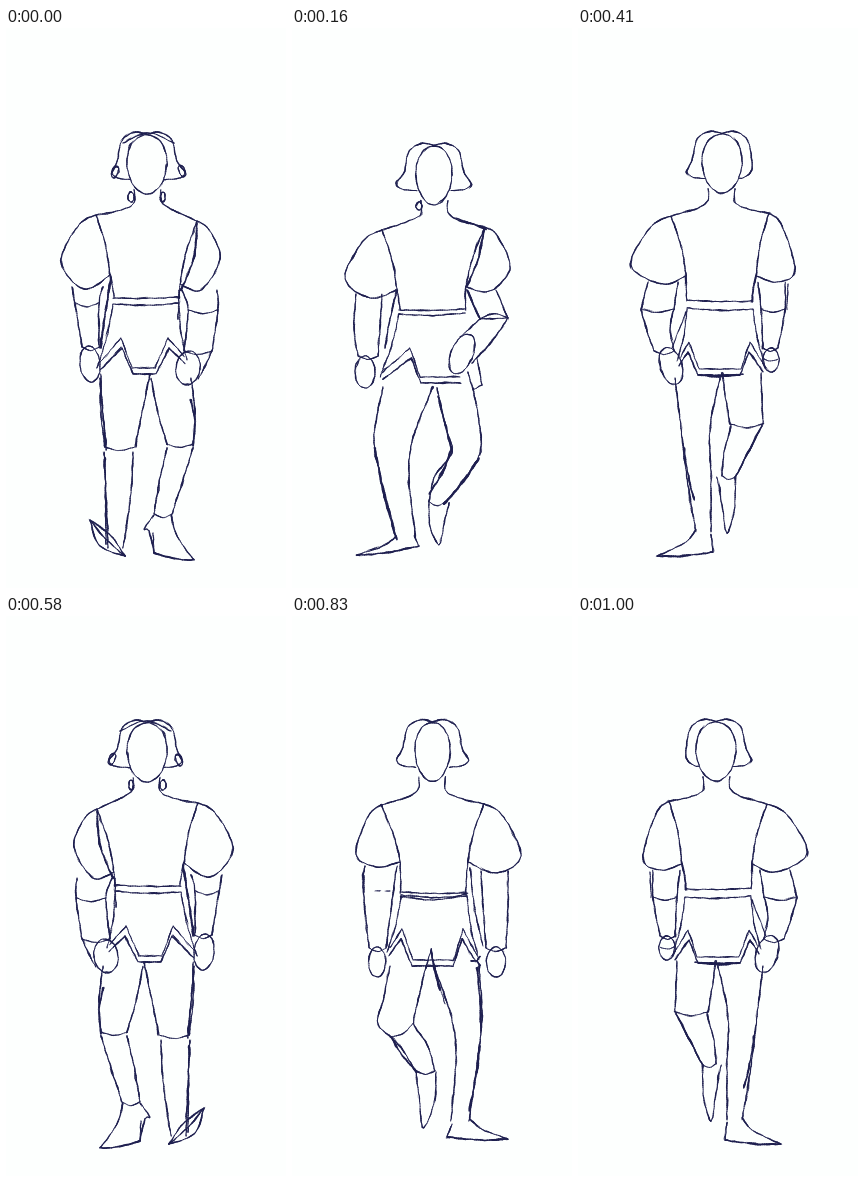
An HTML page with a canvas for the animation above (1.08 s loop, 280 by 560 pixels).

```html
<!DOCTYPE html>
<html lang="en">
<head>
<meta charset="utf-8">
<title>Walk cycle</title>
<style>
html, body { margin: 0; width: 100%; height: 100%; overflow: hidden; background: #fdfffe; }
canvas { display: block; }
</style>
</head>
<body>
<canvas id="stage" width="280" height="560"></canvas>
<script>
const ctx = document.getElementById('stage').getContext('2d');
const PAPER = '#fdfffe', INK = '#1f2050';
const AXIS = 141, LOOP = 1080;

const mix = (a, b, t) => a + (b - a) * t;
const between = (a, b, tx, ty = tx) => [mix(a[0], b[0], tx), mix(a[1], b[1], ty)];
const wave = (d, seed) => (Math.sin(d * 0.13 + seed) + Math.sin(d * 0.37 + seed * 2.3)) / 2;

// Catmull-Rom position on one axis
function spline(a, b, c, d, t) {
  return b + t * ((c - a) + t * ((2 * a - 5 * b + 4 * c - d) + t * (3 * b - a - 3 * c + d))) / 2;
}

// Trace the points about every 2 px
function trace(points, smooth) {
  const at = i => points[Math.max(0, Math.min(points.length - 1, i))];
  const out = [points[0]];
  for (let i = 0; i < points.length - 1; i++) {
    const a = at(i - 1), b = at(i), c = at(i + 1), d = at(i + 2);
    const steps = Math.max(2, Math.ceil(Math.hypot(c[0] - b[0], c[1] - b[1]) / 2));
    for (let s = 1; s <= steps; s++) {
      const t = s / steps;
      out.push(smooth ? [0, 1].map(k => spline(a[k], b[k], c[k], d[k], t)) : between(b, c, t));
    }
  }
  return out;
}

// A main pencil line, then a loose second one that comes and goes
function sketch(weight, points, smooth) {
  const path = trace(points, smooth);
  const seed = points[0][0] * 1.7 + points[0][1];
  for (let pass = 0; pass < 2; pass++) {
    const drift = d => pass * 0.9 * wave(d / 3, seed + 4) + 0.35 * wave(d * 2, seed + pass);
    for (let i = 1; i < path.length; i++) {
      const d = i * 2, press = wave(d, seed + pass * 5);
      const width = weight * (pass ? 0.2 + 1.1 * press : 1.1 + 0.35 * press);
      if (width < 0.2) continue;
      ctx.lineWidth = width;
      ctx.beginPath();
      ctx.moveTo(path[i - 1][0] + drift(d - 2), path[i - 1][1] + drift(d + 5));
      ctx.lineTo(path[i][0] + drift(d), path[i][1] + drift(d + 7));
      ctx.stroke();
    }
  }
}

const pen = (weight, ...points) => sketch(weight, points, true);
const edge = (weight, ...points) => sketch(weight, points, false);

// Arc from a to b; a positive bend bulges left of a downward stroke
function bow(weight, a, b, bend) {
  const dx = b[0] - a[0], dy = b[1] - a[1], len = Math.hypot(dx, dy), m = between(a, b, 0.5);
  pen(weight, a, [m[0] - dy / len * bend, m[1] + dx / len * bend], b);
}

// Ellipse; a positive taper narrows the bottom
function oval([x, y], rx, ry, tilt = 0, taper = 0) {
  const points = [];
  for (let i = 0; i <= 16; i++) {
    const a = i * Math.PI / 8;
    const u = rx * Math.cos(a) * (1 - taper * Math.sin(a)), v = ry * Math.sin(a);
    points.push([x + u * Math.cos(tilt) - v * Math.sin(tilt), y + u * Math.sin(tilt) + v * Math.cos(tilt)]);
  }
  pen(1, ...points);
}

// Rows are [y, left, right]; the last few get a seam across
function limb(seams, ...rows) {
  pen(1.15, ...rows.map(([y, l]) => [l, y]));
  pen(1.15, ...rows.map(([y, , r]) => [r, y]));
  for (const [y, l, r] of rows.slice(rows.length - seams)) bow(0.9, [l, y], [r, y], 3.5);
}

function head([x, y], w, flicks) {
  oval([x, y], w, 29.5, 0, 0.08);
  flicks.forEach((flick, i) => {
    const p = (dx, dy) => [x + (i ? dx : -dx), y + dy];
    pen(1.1, p(0, -30), p(13, -32), p(25, -24), p(30, -3), p(flick, 8), p(flick - 7, 14), p(17, 15));
  });
}

// Puffed sleeve, its seam and the side of the torso
function sleeve([top, out, low, pit], waist) {
  const inward = top[0] < AXIS ? 2.5 : -2.5, m = between(top, pit, 0.5);
  pen(1.1, top, between(top, out, 0.5, 0.22), out, low, pit);
  pen(1.1, top, [m[0] + inward, m[1]], pit, [AXIS - inward * 13, waist]);
}

// Two zigzag lines: end, notch, flat, flat, notch, end
function hem(peak, base, xs) {
  const level = [0.85, 0, 1, 1, 0, 0.6];
  for (const low of [0, 1]) {
    edge(0.9 + low * 0.3, ...xs.map((x, i) => [x + low, mix(peak + low * 10, base + low * 6, level[i])]));
  }
}

function body({ face, width, flicks = [36, 36], left, right, waist, gap, notch, base, xs }) {
  const [x, y] = face;
  head(face, width, flicks);
  pen(1, [x - 13, y + 25], [x - 13, y + 38], [x - 24, y + 45], left[0]);
  pen(1.1, [x + 14, y + 25], [x + 14, y + 37], [x + 25, y + 45], right[0]);
  sleeve(left, waist);
  sleeve(right, waist);
  bow(1, [107, waist], [173, waist - 1], 1);
  bow(1, [107, waist + gap], [173, waist + gap - 1], 2);
  hem(notch, base, xs);
  bow(0.9, [107, waist + gap], [xs[0] - 2, base], -2);
  if (xs.length > 4) bow(0.9, [173, waist + gap], [xs[5] + 3, base - 8], 2);
}

// Foot hanging from the ankle line to its toe
function hanging(l, r, y, toe) {
  pen(1, [l, y], [mix(l, toe[0], 0.3) - 2, mix(y, toe[1], 0.55)], toe, [mix(r, toe[0], 0.5), mix(y, toe[1], 0.5)], [r, y]);
}

// Foot on the ground; front and back are the ankle's two sides
function standing(front, back, toe, heel) {
  const sole = between(toe, heel, 0.45);
  pen(1.1, front, between(front, toe, 0.3, 0.5), toe);
  pen(1.5, toe, [sole[0], sole[1] + 2], heel);
  bow(1, heel, back, 0);
}

function contact() {
  body({
    face: [141, 136.5], width: 20, flicks: [35, 38],
    left: [[90, 187], [55, 234], [78, 261], [104, 247]],
    right: [[191, 193], [214, 230], [195, 262], [174, 256]],
    waist: 270, gap: 6, notch: 310, base: 340, xs: [93, 115, 126, 149, 162, 178]
  });
  bow(1, [117, 115], [168, 115], -10);
  oval([109, 144], 3, 6, 0.4);
  oval([176, 143], 3, 6, -0.4);
  oval([125, 169], 3, 5);
  oval([157, 169], 2, 5);
  bow(1.6, [191, 195], [175, 262], -5);
  // arms
  limb(2, [259, 66, 97], [275, 69, 93], [319, 76, 93]);
  limb(2, [262, 176, 211], [282, 182, 212], [323, 178, 206]);
  bow(1.7, [105, 249], [94, 320], 0);
  bow(1, [173, 262], [172, 291], 0);
  oval([84, 336], 10, 18, -0.1);
  oval([182, 340], 12, 17, 0.15);
  bow(1, [206, 322], [192, 351], -1);
  // legs
  limb(1, [346, 95, 144], [385, 95, 136], [419, 99, 129]);
  limb(0, [424, 98, 127], [465, 100, 125], [520, 102, 117]);
  limb(1, [350, 145, 185], [385, 152, 189], [416, 161, 187]);
  limb(1, [420, 161, 187], [455, 153, 176], [486, 148, 166]);
  bow(1.4, [94, 350], [100, 422], 0);
  bow(1.2, [99, 430], [100, 516], 0);
  bow(1.4, [185, 372], [187, 418], -3);
  for (const bend of [11, 2, -4]) bow(1.2, [84, 492], [119, 528], bend);
  standing([165, 487], [147, 505], [188, 532], [148, 525]);
  pen(1.2, [148, 487], [138, 501], [143, 503], [148, 524]);
}

function down() {
  body({
    face: [142, 147.5], width: 18, flicks: [38, 37],
    left: [[90, 202], [53, 250], [78, 270], [105, 262]],
    right: [[193, 199], [218, 240], [198, 263], [174, 259]],
    waist: 282, gap: 4, notch: 320, base: 349, xs: [90, 118, 128, 168]
  });
  oval([127, 178], 3, 4);
  bow(1.5, [164, 190], [194, 201], 0);
  bow(1.6, [192, 201], [175, 258], -3);
  // arms
  limb(1, [266, 64, 90], [300, 62, 88], [328, 66, 86]);
  bow(1.3, [105, 262], [93, 320], 1);
  oval([73, 344], 10, 16);
  bow(1, [204, 262], [216, 290], 0);
  bow(1.6, [175, 262], [188, 291], 0);
  for (const bend of [-5, 0]) bow(1, [188, 291], [216, 290], bend);
  bow(1, [188, 291], [168, 309], 0);
  bow(1.3, [216, 290], [180, 335], -2);
  oval([170, 326], 11, 21, 0.4);
  edge(1, [176, 344], [181, 362], [190, 357], [185, 330]);
  // legs
  limb(0, [359, 91, 141], [410, 82, 121], [450, 89, 117], [512, 105, 124]);
  limb(1, [360, 145, 181], [400, 154, 188], [424, 160, 188], [448, 143, 175], [474, 137, 153]);
  bow(1.5, [83, 420], [104, 510], 2);
  bow(1.4, [146, 368], [160, 424], 0);
  bow(1.7, [160, 418], [137, 466], -3);
  bow(1.7, [187, 430], [152, 476], -2);
  standing([104, 508], [122, 508], [65, 527], [127, 518]);
  hanging(137, 157, 475, [147, 517]);
}

function pass() {
  body({
    face: [141.5, 136], width: 17.5,
    left: [[90, 188], [53, 240], [78, 257], [106, 246]],
    right: [[193, 189], [218, 238], [197, 251], [174, 246]],
    waist: 277, gap: 3, notch: 313, base: 344, xs: [97, 111, 120, 161, 172, 184]
  });
  bow(1, [107, 278], [173, 280], 5);
  // arms
  limb(1, [255, 66, 93], [290, 66, 91], [332, 68, 88]);
  limb(1, [250, 177, 209], [270, 180, 211], [332, 188, 205]);
  bow(1, [104, 252], [91, 330], -2);
  bow(1.4, [211, 259], [210, 276], 0);
  for (const x of [184, 194]) bow(0.6, [x, 275], [x + 5, 275], 0);
  oval([78, 346], 9.5, 15);
  oval([197, 346], 8.5, 15);
  // loose scribble at the corner of the tunic
  for (let i = 0; i < 6; i++) {
    const a = i * 2.1;
    bow(1, [97, 345], [97 + 6 * Math.cos(a), 345 + 5 * Math.sin(a)], 0);
  }
  bow(1.6, [143, 333], [134, 374], -1);
  bow(0.8, [143, 334], [129, 388], -1);
  bow(1, [143, 334], [148, 352], 0);
  // legs
  limb(0, [350, 95, 140], [400, 92, 123], [440, 96, 118], [505, 105, 123]);
  limb(1, [350, 148, 184], [385, 156, 191], [408, 160, 196], [428, 147, 176], [455, 139, 158]);
  bow(1.5, [97, 352], [93, 415], 1);
  bow(1.5, [94, 430], [105, 495], 1);
  bow(0.8, [160, 406], [184, 421], 4);
  bow(1.5, [182, 422], [157, 456], -2);
  standing([104, 503], [122, 508], [66, 523], [127, 521]);
  hanging(138, 158, 456, [151, 512]);
}

function rise() {
  body({
    face: [138, 135.5], width: 20, flicks: [29, 35],
    left: [[91, 185], [65, 243], [83, 254], [104, 248]],
    right: [[189, 188], [229, 237], [198, 256], [174, 248]],
    waist: 273, gap: 8, notch: 314, base: 341, xs: [96, 110, 119, 161, 171, 180]
  });
  // arms
  limb(2, [254, 75, 102], [281, 75, 99], [320, 82, 97]);
  limb(1, [254, 182, 212], [281, 186, 219]);
  limb(1, [281, 186, 219], [300, 190, 214], [323, 186, 206]);
  bow(1, [104, 249], [108, 274], -1);
  bow(0.8, [72, 256], [73, 282], 0);
  bow(0.9, [174, 284], [188, 320], 0);
  oval([89, 332], 8, 12);
  bow(0.8, [82, 331], [97, 331], 2);
  oval([189, 338], 11, 19, 0.3);
  bow(1.6, [117, 346], [162, 347], 2);
  // legs
  limb(1, [345, 99, 138], [372, 98, 134], [396, 97, 130]);
  limb(1, [398, 98, 129], [425, 112, 136], [448, 124, 138]);
  limb(0, [350, 140, 185], [400, 150, 179], [450, 149, 173], [504, 149, 164]);
  bow(1.4, [98, 397], [124, 448], 0);
  bow(1.3, [176, 420], [166, 472], -1);
  hanging(125, 143, 449, [133, 505]);
  standing([164, 502], [149, 506], [203, 528], [147, 524]);
}

// start time, pose, mirrored
const STEPS = [
  [0, contact, false], [160, down, false], [330, pass, false], [410, rise, true],
  [580, contact, true], [660, down, true], [830, pass, true], [1000, rise, false]
];

let shown = null;

function show(now) {
  const time = now % LOOP;
  const step = STEPS.filter(s => s[0] <= time).pop();
  if (step === shown) return;
  shown = step;
  const [, pose, mirrored] = step;
  ctx.setTransform(1, 0, 0, 1, 0, 0);
  ctx.fillStyle = PAPER;
  ctx.fillRect(0, 0, 280, 560);
  if (mirrored) ctx.setTransform(-1, 0, 0, 1, 2 * AXIS, 0);
  ctx.strokeStyle = INK;
  ctx.lineCap = 'round';
  pose();
}

function tick() {
  show(performance.now());
  requestAnimationFrame(tick);
}
tick();
</script>
</body>
</html>
```
